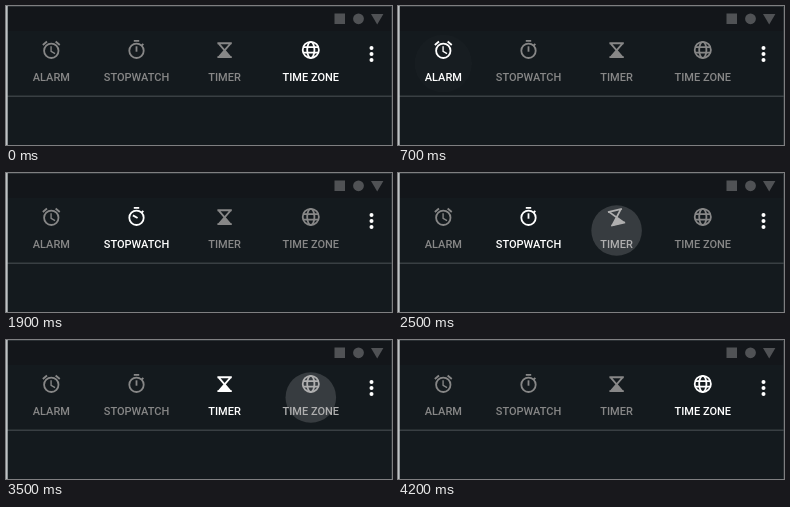
Animation, 386 px wide and 139 px high, one loop 4400 ms. Source, as an HTML page:

```html
<!DOCTYPE html>
<html lang="en">
<head>
<meta charset="utf-8">
<title>Clock tabs</title>
<style>
  html, body { margin: 0; width: 100%; height: 100%; overflow: hidden; background: #141a1e; }
  svg { display: block; width: 100%; height: 100%; }
  text { font: 500 11px Roboto, sans-serif; text-anchor: middle; fill: currentColor; }
  .icon { fill: none; stroke: currentColor; stroke-width: 2; }
  .solid { fill: currentColor; stroke: none; }
</style>
</head>
<body>
<svg viewBox="0 0 386 139">
  <rect width="386" height="139" fill="#141a1e"/>
  <rect width="386" height="25" fill="#13161a"/>
  <path d="M0 .5H385.5V139" fill="none" stroke="#2b3034"/>
  <rect y="89.6" width="386" height="1.2" fill="#43494d"/>
  <rect width="1.7" height="139" fill="#bfc3c5"/>
  <g fill="#505255">
    <rect x="328.5" y="7.5" width="10.5" height="10.5"/>
    <circle cx="352.5" cy="12.8" r="5.4"/>
    <path d="M365 8h12.4l-6.2 10.4z"/>
  </g>
  <g fill="#fff">
    <circle cx="365.5" cy="42" r="2"/>
    <circle cx="365.5" cy="48" r="2"/>
    <circle cx="365.5" cy="54" r="2"/>
  </g>
  <circle id="ripple" cy="57.5" fill="#fff"/>
  <g id="tabs"></g>
</svg>
<script>
const LOOP = 4400, TAP_EVERY = 1000, FIRST_TAP = 500, TICK = 100;
const DIM = 135, BRIGHT = 255;

const smooth = p => p * p * (3 - 2 * p);

// Icons are drawn on a 24-unit grid; turn gives the angle of the .moving part.
const tabs = [
  { x: 45.3, label: 'ALARM', turn: p => 8 * Math.sin(4 * Math.PI * p), icon: `
    <circle cx="12" cy="13" r="8"/>
    <path class="moving" d="M2.6 6.5l4.6-3.9M21.4 6.5l-4.6-3.9"/>
    <path d="M11.75 8v5.6l4.4 2.6" stroke-width="1.5"/>` },
  { x: 130.5, label: 'STOPWATCH', turn: p => 360 * p, icon: `
    <circle cx="12" cy="13" r="8"/>
    <path d="M9 2h6M17.6 7.4l2-2"/>
    <path class="moving" d="M12 8v6"/>` },
  { x: 218.6, label: 'TIMER', turn: p => -180 * smooth(p), icon: `
    <g class="moving">
      <path d="M4 4.6h16M4 20h16M5.5 5l13 15M18.5 5l-13 15"/>
      <path class="solid" d="M12 12l7.4 8.5H4.6z"/>
    </g>` },
  { x: 304.8, label: 'TIME ZONE', icon: `
    <circle cx="12" cy="12" r="9"/>
    <ellipse cx="12" cy="12" rx="4" ry="9"/>
    <path d="M3.5 9h17M3.5 15h17"/>` }
];

const ripple = document.getElementById('ripple');
const group = document.getElementById('tabs');
group.innerHTML = tabs.map(({ x, label, icon }) => `
  <g>
    <g class="icon" transform="translate(${x - 10.8} 33.1) scale(.9)">${icon}</g>
    <text x="${x}" y="75.3">${label}</text>
  </g>`).join('');

const clamp = v => Math.max(0, Math.min(1, v));

function draw(time) {
  const now = Math.floor(time % LOOP / TICK) * TICK;
  const sinceFirst = now - FIRST_TAP;
  const active = sinceFirst < 0 ? 3 : Math.floor(sinceFirst / TAP_EVERY);
  const previous = (active + 3) % 4;
  const age = sinceFirst < 0 ? TAP_EVERY : sinceFirst % TAP_EVERY;

  const progress = clamp((age + TICK) / 600);
  const fadeIn = clamp((age + TICK) / 300);
  const fadeOut = clamp(1 - age / 200);
  [...group.children].forEach((tab, i) => {
    const amount = i === active ? fadeIn : i === previous ? fadeOut : 0;
    const v = Math.round(DIM + (BRIGHT - DIM) * amount);
    tab.style.color = `rgb(${v},${v},${v})`;
    const { turn } = tabs[i];
    if (turn) {
      const angle = i === active && progress < 1 ? turn(progress) : 0;
      tab.querySelector('.moving').setAttribute('transform', `rotate(${angle} 12 12.6)`);
    }
  });

  const life = clamp(age / 500);
  ripple.setAttribute('cx', tabs[active].x);
  ripple.setAttribute('r', 25.3 + 4.5 * (1 - (1 - life) ** 3));
  ripple.setAttribute('opacity', 0.15 * (1 - life) ** 5);
}

function frame() {
  draw(performance.now());
  requestAnimationFrame(frame);
}
frame();
</script>
</body>
</html>
```
